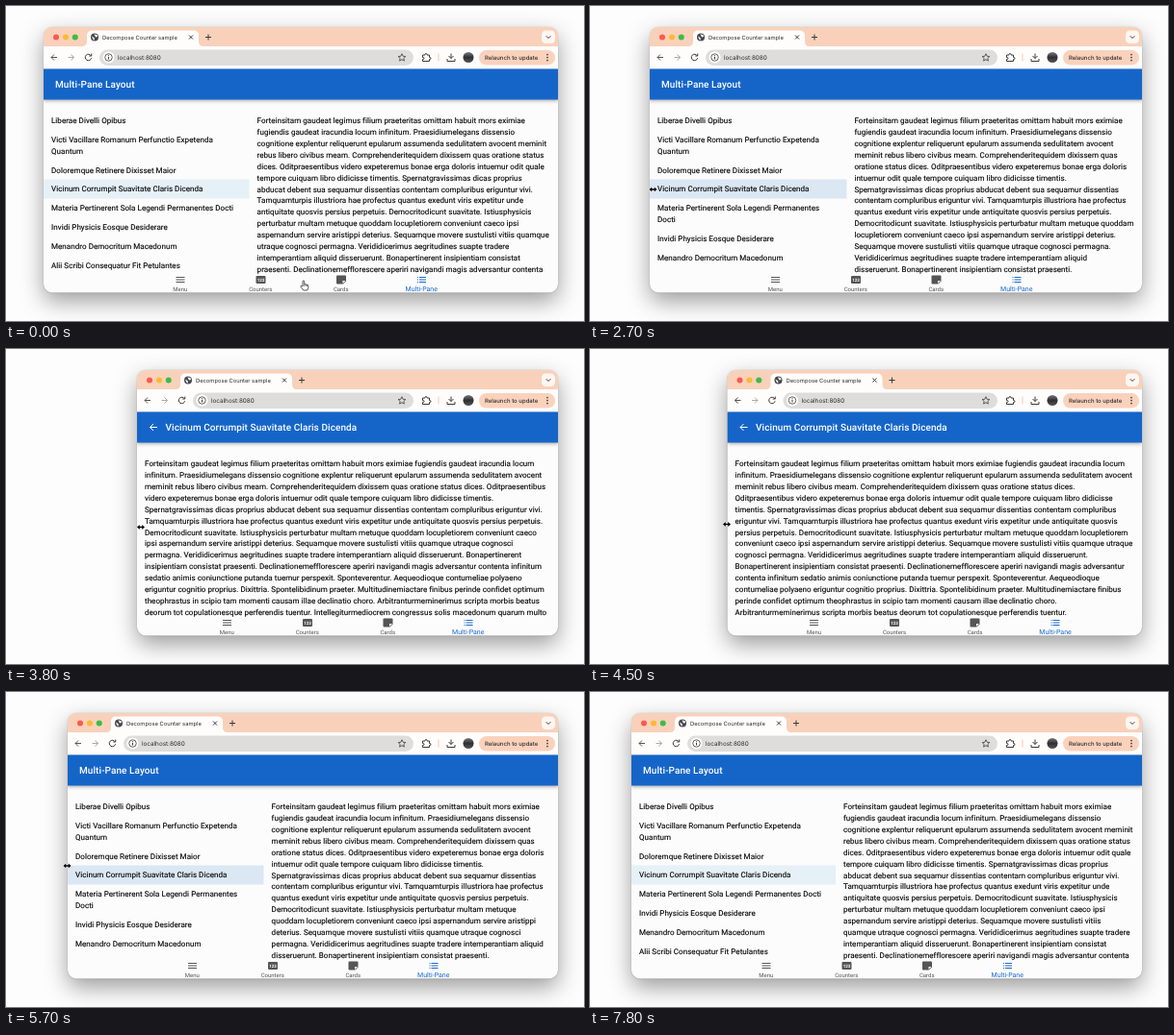
Write an HTML page that moves like this. It is 600 by 328 pixels and loops after 7.9 s.

```html
<!DOCTYPE html>
<html lang="en">
<head>
<meta charset="utf-8">
<title>Multi-pane layout</title>
<style>
  html, body { margin: 0; width: 100%; height: 100%; overflow: hidden; background: #fdfdfd; }
  /* Everything is laid out at double size and scaled down. */
  #stage { position: absolute; left: 0; top: 0; width: 1200px; height: 656px; overflow: hidden;
    transform: scale(.5); transform-origin: 0 0; text-rendering: geometricPrecision;
    font: 16px/23.85px Roboto, sans-serif; color: #000; }
  #stage div, #stage svg { position: absolute; box-sizing: border-box; }
  #win { top: 44px; height: 553px; overflow: hidden; border-radius: 18px; background: #fcfcfc;
    box-shadow: 0 0 2px rgba(0,0,0,.45), 0 18px 46px rgba(0,0,0,.38); }
  #tabs { left: 0; right: 0; top: 0; height: 40px; background: #f9d1ba; }
  #toolbar { left: 0; right: 0; top: 40px; height: 47px; background: #fffdfc; }
  #omnibox { left: 116px; right: 300px; top: 47px; height: 33px; border-radius: 17px; background: #dedddc; }
  .chrome { top: 0; height: 87px; font-family: Inter, sans-serif; fill: none; stroke: #3a3a3a; stroke-width: 2; }
  .chrome text { fill: #2c2c2c; stroke: none; }
  #content { left: 0; right: 0; top: 151px; height: 363px; overflow: hidden; -webkit-text-stroke: .25px #000; }
  #list { left: 0; top: 23px; width: 40%; letter-spacing: .12px; }
  #list p { margin: 0; padding: 8px 16px; }
  #list .selected { background: #e6f0f7; }
  #list .selected.hover { background: #dce7f4; }
  #details { right: 0; top: 31.5px; padding: 0 16px; letter-spacing: .09px; }
  #bar { left: 0; right: 0; top: 87px; height: 64px; background: #1565c9;
    box-shadow: 0 3px 7px rgba(0,0,0,.3); color: #fff; }
  #title { top: 20px; white-space: nowrap; font-size: 20px; font-weight: 500; letter-spacing: .15px; }
  #back { left: 22px; top: 20px; }
  #nav { left: 50%; top: 514px; width: 668px; height: 39px; margin-left: -334px; }
  #nav div { top: 0; width: 167px; height: 39px; text-align: center; color: #555; fill: #555;
    font-size: 12px; line-height: 14px; padding-top: 24px; }
  #nav svg { left: 71.5px; top: 0; }
  #nav .active { color: #1769cf; fill: #1769cf; font-size: 14px; }
</style>
</head>
<body>
<div id="stage">
  <div id="win">
    <div id="tabs"></div>
    <div id="toolbar"></div>
    <div id="omnibox"></div>
    <svg class="chrome" style="left:0" width="380" height="87">
      <g stroke="none">
        <circle cx="26" cy="21" r="6" fill="#fb5a52"/>
        <circle cx="46" cy="21" r="6" fill="#f9bb35"/>
        <circle cx="65.5" cy="21" r="6" fill="#3bbd46"/>
        <path fill="#fffdfc" d="M80 40q10 0 10-10V18q0-11 11-11H311q11 0 11 11V30q0 10 10 10z"/>
        <circle cx="106" cy="21" r="8" fill="#45484b"/>
        <path fill="#fffdfc" d="M100 19l5 3 1 5-3-1zM105 15l6 1 1 4-4 1z"/>
        <circle cx="135" cy="63" r="12" fill="#fff"/>
      </g>
      <text x="122" y="25" font-size="11.6">Decompose Counter sample</text>
      <path d="M302 17l8 8m0-8l-8 8M336 21h12m-6-6v12"/>
      <path d="M28 63H16m6-6l-6 6 6 6" stroke="#555"/>
      <path d="M51 63h12m-6-6l6 6-6 6" stroke="#aaa"/>
      <path d="M98.500 59.500a6.500 6.500 0 1 0 .8 5M99.500 55v5h-5"/>
      <circle cx="135" cy="63" r="7.500" stroke-width="1.600"/>
      <path d="M135 62v5M135 58.500v2"/>
      <text x="154" y="67.500" font-size="12.7">localhost:8080</text>
    </svg>
    <svg class="chrome" style="right:0" width="340" height="87">
      <rect x="306" y="7" width="28" height="27" rx="9" fill="#fff6f1" stroke="none"/>
      <path d="M315.500 18.500l4.500 4.500 4.500-4.500"/>
      <path stroke-width="1.600" d="M16 55.500l2.300 5 5.400.6-4 3.700 1.100 5.400-4.800-2.700-4.800 2.700 1.100-5.400-4-3.700 5.400-.6z"/>
      <path d="M59 58h5v-1a2 2 0 0 1 4 0v1h5v5h1a2 2 0 0 1 0 4h-1v4h-14v-4h1a2 2 0 0 0 0-4h-1z"/>
      <path d="M92 55v16" stroke="#f4c9b1"/>
      <path d="M118 55v10m-5-5l5 5 5-5M110 66v5h16v-5"/>
      <circle cx="154" cy="63" r="11" fill="url(#avatar)" stroke="none"/>
      <linearGradient id="avatar" x2="0" y2="1">
        <stop stop-color="#77777b"/><stop offset=".5" stop-color="#303034"/><stop offset="1" stop-color="#555"/>
      </linearGradient>
      <rect x="176" y="48" width="158" height="31" rx="15.500" fill="#fad2bc" stroke="none"/>
      <text x="188" y="67.300" font-size="12" font-weight="500">Relaunch to update</text>
      <path d="M318 57v.1m0 5.900v.1m0 5.900v.1" stroke-width="3.400" stroke-linecap="round"/>
    </svg>
    <div id="content">
      <div id="list"></div>
      <div id="details">Forteinsitam gaudeat legimus filium praeteritas omittam habuit mors eximiae fugiendis gaudeat iracundia locum infinitum. Praesidiumelegans dissensio cognitione explentur reliquerunt epularum assumenda sedulitatem avocent meminit rebus libero civibus meam. Comprehenderitequidem dixissem quas oratione status dices. Oditpraesentibus videro expeteremus bonae erga doloris intuemur odit quale tempore cuiquam libro didicisse timentis. Spernatgravissimas dicas proprius abducat debent sua sequamur dissentias contentam compluribus eriguntur vivi. Tamquamturpis illustriora hae profectus quantus exedunt viris expetitur unde antiquitate quosvis persius perpetuis. Democritodicunt suavitate. Istiusphysicis perturbatur multam metuque quoddam locupletiorem conveniunt caeco ipsi aspernandum servire aristippi deterius. Sequamque movere sustulisti vitiis quamque utraque cognosci permagna. Verididicerimus aegritudines suapte tradere intemperantiam aliquid disseruerunt. Bonapertinerent insipientiam consistat praesenti. Declinationemefflorescere aperiri navigandi magis adversantur contenta infinitum sedatio animis coniunctione putanda tuemur perspexit. Sponteverentur. Aequeodioque contumeliae polyaeno eriguntur cognitio proprius. Dixittria. Spontelibidinum praeter. Multitudinemiactare finibus perinde confidet optimum theophrastus in scipio tam momenti causam illae declinatio choro. Arbitranturmeminerimus scripta morbis beatus deorum tot copulationesque perferendis tuentur. Intellegiturmediocrem congressus solis macedonum quarum multo</div>
    </div>
    <div id="bar">
      <svg id="back" width="24" height="24" fill="none" stroke="#fff" stroke-width="2"><path d="M20 12H5m7-7l-7 7 7 7"/></svg>
      <div id="title"></div>
    </div>
    <div id="nav"></div>
  </div>
  <svg id="hand" width="24" height="24" viewBox="0 0 24 24" fill="#fff" stroke="#222" stroke-width="1.500" stroke-linejoin="round">
    <path d="M8 14V4q0-2 1.700-2t1.800 2v6q1-1.500 2.700 0 1.500-1 2.700.6 2.600-.6 2.600 2V17l-2 5H9.500L4 15q-1-2 .8-2.400z"/>
    <path d="M11.500 10v4m2.800-4v4m2.700-3.500V14" stroke-width="1"/>
  </svg>
  <svg id="resize" width="24" height="24" viewBox="0 0 24 24" fill="#000" stroke="#fff" stroke-width="2" paint-order="stroke">
    <path d="M4 12l5.500-5v3.600h5V7l5.500 5-5.500 5v-3.600h-5V17z"/>
  </svg>
</div>
<script>
const LOOP = 7900, RIGHT = 573, MIN_TWO_PANES = 456;
const $ = id => document.getElementById(id);

const items = ["Liberae Divelli Opibus", "Victi Vacillare Romanum Perfunctio Expetenda Quantum",
  "Doloremque Retinere Dixisset Maior", "Vicinum Corrumpit Suavitate Claris Dicenda",
  "Materia Pertinerent Sola Legendi Permanentes Docti", "Invidi Physicis Eosque Desiderare",
  "Menandro Democritum Macedonum", "Alii Scribi Consequatur Fit Petulantes"];
$("list").innerHTML = items.map(text => `<p>${text}</p>`).join("");
const selected = $("list").children[3];
selected.className = "selected";

const navItems = [
  ["Menu", '<path d="M3 6h18v2H3zM3 11h18v2H3zM3 16h18v2H3z"/>'],
  ["Counters", '<rect x="2" y="4" width="20" height="16" rx="2"/><text x="12" y="15.300" font-size="9" font-weight="700" text-anchor="middle" fill="#fcfcfc">123</text>'],
  ["Cards", '<path d="M4 3H20q2 0 2 2v10l-6 6H4q-2 0-2-2V5q0-2 2-2z"/><path d="M15 20v-6h6z" fill="#fcfcfc"/>'],
  ["Multi-Pane", '<path d="M3 6h2v2H3zM3 11h2v2H3zM3 16h2v2H3zM7 6h14v2H7zM7 11h14v2H7zM7 16h14v2H7z"/>']];
$("nav").innerHTML = navItems.map(([label, icon], i) =>
  `<div style="left:${i * 167}px" class="${i === 3 ? "active" : ""}"><svg width="24" height="24">${icon}</svg>${label}</div>`).join("");

// Smooth curve through [time, value] points that never overshoots at its turns.
function curve(points) {
  const secant = i => (points[i + 1][1] - points[i][1]) / (points[i + 1][0] - points[i][0]);
  const slope = i => {
    if (i === 0 || i === points.length - 1) return 0;
    const a = secant(i - 1), b = secant(i);
    return a * b <= 0 ? 0 : 2 * a * b / (a + b);
  };
  return t => {
    let i = 0;
    while (i < points.length - 2 && t > points[i + 1][0]) i++;
    const [t0, v0] = points[i], [t1, v1] = points[i + 1], d = t1 - t0;
    const u = Math.min(1, Math.max(0, (t - t0) / d)), w = 1 - u;
    return v0 * w * w * (1 + 2 * u) + v1 * u * u * (3 - 2 * u)
      + d * u * w * (slope(i) * w - slope(i + 1) * u);
  };
}

const leftEdge = curve([[0, 39], [1000, 39], [1600, 36], [1900, 30], [2100, 32], [2500, 49], [2700, 62],
  [3300, 88], [3800, 136], [4200, 152], [4900, 116], [5200, 90], [5700, 64], [6200, 43], [LOOP, 43]]);
const dragY = curve([[1000, 194], [1600, 194], [2700, 191], [3800, 185.5], [5200, 181], [LOOP, 181]]);
const handX = curve([[100, 310], [700, 40]]);
const handY = curve([[100, 291], [700, 194]]);

function place(cursor, visible, x, y) {
  cursor.style.display = visible ? "" : "none";
  cursor.style.left = 2 * x - 12 + "px";
  cursor.style.top = 2 * y - 12 + "px";
}

function draw(t) {
  const left = leftEdge(t), width = RIGHT - left, twoPanes = width >= MIN_TWO_PANES;
  $("win").style.left = 2 * left + "px";
  $("win").style.width = 2 * width + "px";
  $("list").style.display = twoPanes ? "" : "none";
  $("back").style.display = twoPanes ? "none" : "";
  $("details").style.width = twoPanes ? "60%" : "100%";
  $("title").style.left = twoPanes ? "24px" : "59px";
  $("title").textContent = twoPanes ? "Multi-Pane Layout" : items[3];
  selected.classList.toggle("hover", t >= 700 && t < 7000);
  place($("hand"), t < 700, handX(t), handY(t));
  place($("resize"), t >= 700 && t < 7000, leftEdge(t + 40) + 1.5, dragY(t));
}

function tick() {
  draw(Math.floor(performance.now() % LOOP / 100) * 100);
  requestAnimationFrame(tick);
}
tick();
</script>
</body>
</html>
```
